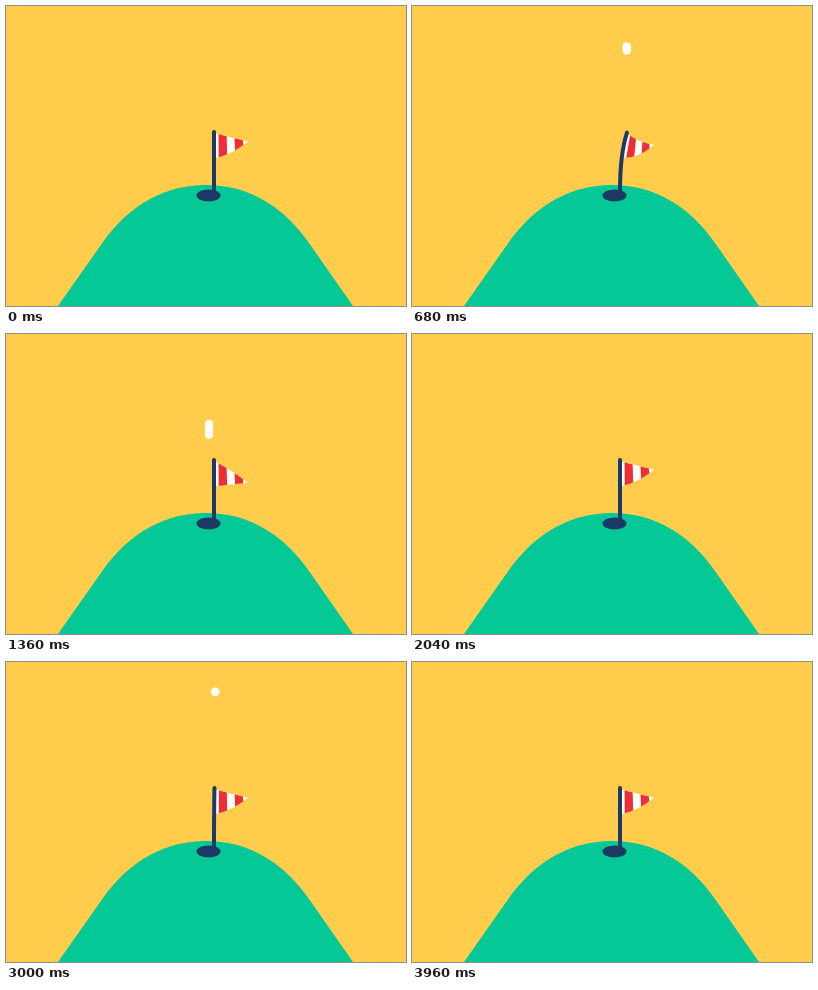
An HTML page with a canvas that plays this animation: 400x300 px, repeating every 4 s.

```html
<!DOCTYPE html>
<html lang="en">
<head>
<meta charset="utf-8">
<title>Hole in one</title>
<style>
  html, body { margin: 0; width: 100%; height: 100%; overflow: hidden; background: #ffcc4b; }
  canvas { display: block; width: 400px; height: 300px; }
</style>
</head>
<body>
<canvas id="stage" width="400" height="300"></canvas>
<script>
const ctx = document.getElementById('stage').getContext('2d');
const SKY = '#ffcc4b', GRASS = '#05c897', NAVY = '#1d3a66', RED = '#ee2d35', WHITE = '#fffdfa';
const CYCLE = 2000, APEX = 920, LAUNCH = 400;
const HOLE = { x: 202.5, y: 189.5, rx: 12, ry: 6 };
const HILL = new Path2D('M52 300L97 236C124 198 160 179 200 179C240 179 276 198 303 237L347 300Z');

// Sideways swing of the pole tip: [ms, px]
const SWING = [[260, 0], [380, 31], [440, 25], [560, -12], [680, 7], [800, -4], [920, 2], [1040, 0]];
// Ball flying in and being caught by the pole: [ms, x, y]
const ENTRY = [[160, -24, 150], [280, 202, 152], [360, 221, 150], [LAUNCH, 219.7, 141]];

const lerp = (a, b, u) => a + (b - a) * u;
const smooth = (a, b, t) => {
  const u = Math.min(1, Math.max(0, (t - a) / (b - a)));
  return u * u * (3 - 2 * u);
};

function segment(table, t) {
  const i = table.findIndex(step => t < step[0]);
  return i > 0 ? [table[i - 1], table[i]] : null;
}

function swingAt(t) {
  const pair = segment(SWING, t);
  if (!pair) return 0;
  const [a, b] = pair;
  return lerp(a[1], b[1], (1 - Math.cos(Math.PI * (t - a[0]) / (b[0] - a[0]))) / 2);
}

function quad(a, c, b, u) {
  const v = 1 - u;
  return [0, 1].map(k => v * v * a[k] + 2 * u * v * c[k] + u * u * b[k]);
}

function ellipse(x, y, rx, ry) {
  ctx.beginPath();
  ctx.ellipse(x, y, rx, ry, 0, 0, 2 * Math.PI);
}

function ballAt(t) {
  if (t < LAUNCH) {
    const pair = segment(ENTRY, t);
    if (!pair) return null;
    const [a, b] = pair, span = b[0] - a[0], u = (t - a[0]) / span;
    const dx = b[1] - a[1], dy = b[2] - a[2];
    return {
      x: lerp(a[1], b[1], u), y: lerp(a[2], b[2], u),
      speed: Math.min(1, Math.hypot(dx, dy) / span), angle: Math.atan2(dy, dx)
    };
  }
  const [drop, span] = t < APEX ? [89, 480] : [66, 440];
  const u = Math.abs(t - APEX) / span;
  const y = 29 + drop * u ** 2.7;
  if (y > 210) return null;
  return { x: 219 - 0.0174 * (t - 440), y, speed: 2.7 * drop / span * u ** 1.7, angle: Math.PI / 2 };
}

function drawBall(t) {
  const ball = ballAt(t);
  if (!ball) return;
  const length = 8.5 + 26 * ball.speed, width = 8.8 - 1.5 * ball.speed;
  ctx.save();
  // Below the rim the ball shows only inside the hole
  ellipse(HOLE.x, HOLE.y, HOLE.rx, HOLE.ry);
  ctx.rect(-60, 0, 460, HOLE.y);
  ctx.clip();
  ctx.translate(ball.x, ball.y);
  ctx.rotate(ball.angle);
  ctx.beginPath();
  ctx.roundRect(-length / 2, -width / 2, length, width, width / 2);
  ctx.fillStyle = WHITE;
  ctx.fill();
  ctx.restore();
}

function drawFlag(t) {
  const d = swingAt(t);
  const base = [208, 188], bend = [208 - 0.04 * d, 150 - 0.16 * d], top = [208 + d, 126 + d * d / 90];
  const calm = 1 - smooth(200, 300, t) + smooth(700, 1000, t);
  const droop = 8 * (1 - Math.cos(2 * Math.PI * t / 1000)) * calm;

  const hoist = [quad(base, bend, top, 0.97), quad(base, bend, top, 0.52)];
  const tip = [242 + 1.2 * Math.max(0, d - 25), 135.5 + 0.48 * d + droop];
  const upper = [225 + 0.2 * d, 131.5 + 0.68 * d + 0.35 * droop];
  const lower = [226 + 0.12 * d, 148.5 + 0.5 * d + 0.15 * droop];
  const topEdge = u => quad([hoist[0][0] + 1, hoist[0][1]], upper, tip, u);
  const lowEdge = u => quad([hoist[1][0] + 1, hoist[1][1]], lower, tip, u);

  const strip = (from, to, color) => {
    ctx.beginPath();
    for (let i = 0; i <= 8; i++) ctx.lineTo(...topEdge(lerp(from, to, i / 8)));
    for (let i = 8; i >= 0; i--) ctx.lineTo(...lowEdge(lerp(from, to, i / 8)));
    ctx.closePath();
    ctx.fillStyle = color;
    ctx.fill();
  };
  strip(0, 1, WHITE);
  strip(0.11, 0.36, RED);
  strip(0.6, 0.85, RED);

  ctx.beginPath();
  ctx.moveTo(...base);
  ctx.quadraticCurveTo(...bend, ...top);
  ctx.strokeStyle = NAVY;
  ctx.lineWidth = 4;
  ctx.lineCap = 'round';
  ctx.stroke();
}

function drawHole(t) {
  const pulse = smooth(1500, 1580, t) * (1 - smooth(1580, 1800, t));
  ellipse(HOLE.x, HOLE.y, HOLE.rx + 3 * pulse, HOLE.ry + 1.5 * pulse);
  ctx.fillStyle = NAVY;
  ctx.fill();
}

function draw(now) {
  const t = now % CYCLE;
  ctx.fillStyle = SKY;
  ctx.fillRect(0, 0, 400, 300);
  ctx.fillStyle = GRASS;
  ctx.fill(HILL);
  drawHole(t);
  drawFlag(t);
  drawBall(t);
}

const start = performance.now();
function tick() {
  draw(performance.now() - start);
  requestAnimationFrame(tick);
}
tick();
</script>
</body>
</html>
```
